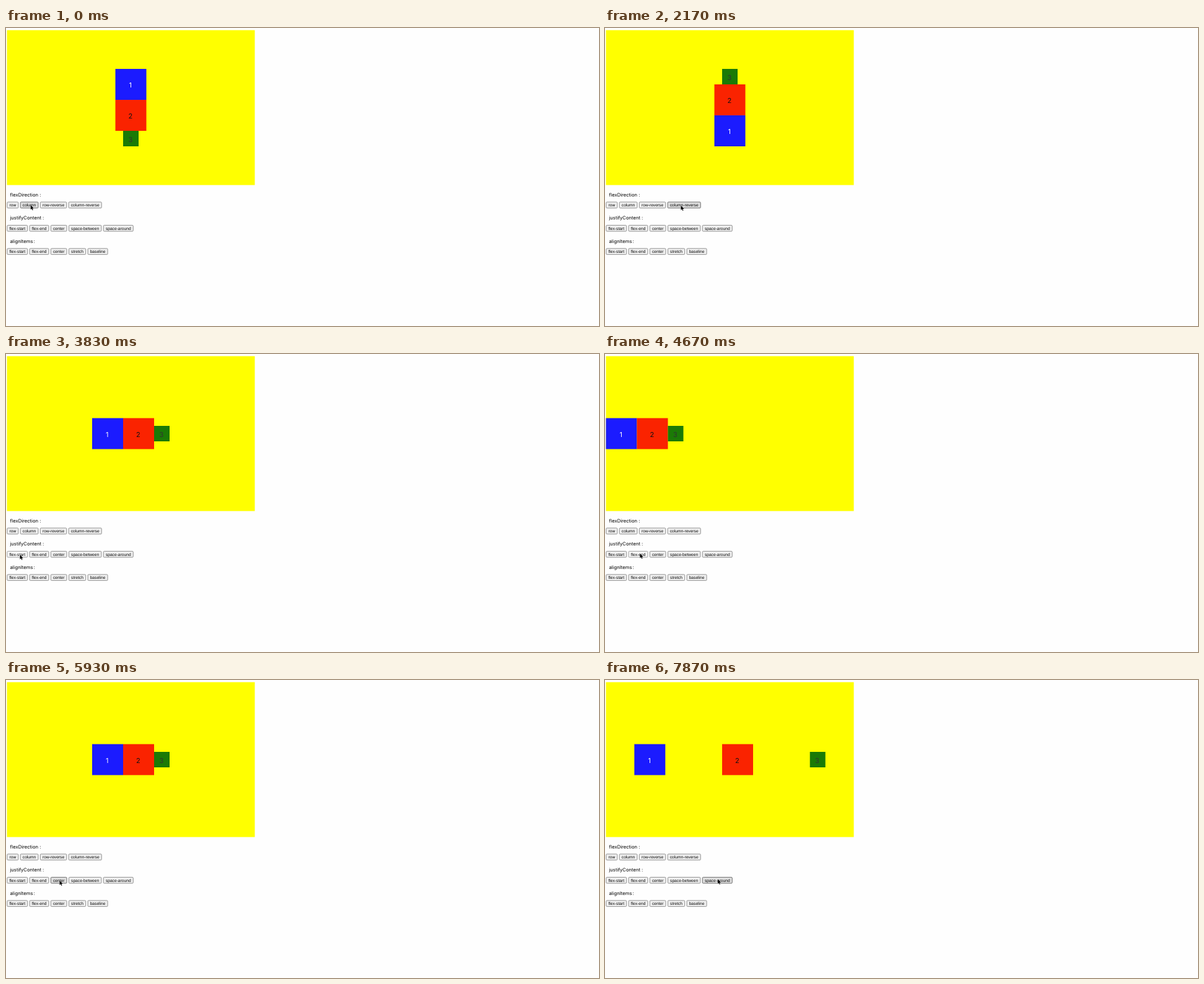
These frames come from a looping animation (957x481 px, 8000 ms). An HTML page:

```html
<!DOCTYPE html>
<html lang="en">
<head>
<meta charset="utf-8">
<title>Flexbox demo</title>
<style>
  html, body { margin: 0; width: 100%; height: 100%; overflow: hidden; background: #fefefe; }
  svg { display: block; width: 100vw; height: 100vh; }
  text { text-rendering: geometricPrecision; user-select: none; }
  .label { font: 7.65px Inter, Roboto, sans-serif; }
  .digit { font: 11px Inter, Roboto, sans-serif; text-anchor: middle; }
  .button text { font: 6.667px "Liberation Sans", Arial, sans-serif; text-anchor: middle; }
  .button rect { fill: #efefef; stroke: #767676; stroke-width: .8; }
  .button.hover rect { fill: #dedede; stroke: #4f4f4f; }
  .button.active rect { fill: #f5f5f5; stroke: #8d8d8d; }
</style>
</head>
<body>
<svg id="stage" viewBox="0 0 957 481"></svg>
<script>
const LOOP = 8000;
const BOX = { x: 1.5, y: 3.5, w: 400, h: 250 };
const BUTTON_H = 10.5, GAP = 2.6;
const stage = document.getElementById('stage');

function add(parent, tag, attrs, text) {
  const node = document.createElementNS('http://www.w3.org/2000/svg', tag);
  for (const key in attrs) node.setAttribute(key, attrs[key]);
  if (text) node.textContent = text;
  return parent.appendChild(node);
}

add(stage, 'rect', { x: BOX.x, y: BOX.y, width: BOX.w, height: BOX.h, fill: '#ffff00' });

const items = [
  { size: 50, fill: '#1b1bff', ink: '#fff', base: 5 },
  { size: 50, fill: '#fa2300', ink: '#111', base: 5 },
  { size: 25, fill: '#1b7a06', ink: '#333', base: 5.5 }
].map((item, i) => {
  const { size, fill, ink, base } = item;
  const node = add(stage, 'g', {});
  add(node, 'rect', { width: size, height: size, fill });
  add(node, 'text', { class: 'digit', x: size / 2 - 0.7, y: size / 2 + base, fill: ink }, String(i + 1));
  return { size, node };
});

// Each row: label, colon position, top of the buttons, [caption, width] pairs.
const rows = [
  ['flexDirection', 54.3, 280.5,
    [['row', 18.74], ['column', 29.5], ['row-reverse', 43.2], ['column-reverse', 53.9]]],
  ['justifyContent', 59, 318,
    [['flex-start', 33.56], ['flex-end', 31.7], ['center', 26.5], ['space-between', 53.2], ['space-around', 48.8]]],
  ['alignItems', 44.5, 355.5,
    [['flex-start', 33.56], ['flex-end', 31.7], ['center', 26.5], ['stretch', 28], ['baseline', 32.8]]]
];

const buttons = [];
for (const [label, colonX, y, captions] of rows) {
  add(stage, 'text', { class: 'label', x: 6.5, y: y - 8.7 }, label);
  add(stage, 'text', { class: 'label', x: colonX, y: y - 8.7 }, ':');
  let x = BOX.x;
  for (const [caption, w] of captions) {
    const node = add(stage, 'g', { class: 'button' });
    add(node, 'rect', { x: x + 0.4, y: y + 0.4, width: w - 0.8, height: BUTTON_H - 0.8, rx: 1.3 });
    add(node, 'text', { x: x + w / 2, y: y + 7.5 }, caption);
    buttons.push({ node, x, y, w });
    x += w + GAP;
  }
}

const cursor = add(stage, 'path', {
  d: 'M0 0V7.4L1.7 5.8L2.8 8.5L4 8L2.9 5.4H5.2Z',
  fill: '#000', stroke: '#fff', 'stroke-width': 0.6, 'paint-order': 'stroke'
});

// Pointer moves: start, end, target x and y, optional bend point.
const home = [39.8, 285.8];
const moves = [
  [200, 430, 76.5, 286.5],
  [900, 1730, 122.5, 286.5, 70, 417],
  [2270, 2400, 44, 290, 95, 330],
  [2430, 2610, 10.5, 286.5],
  [3300, 3720, 22.5, 324],
  [4270, 4620, 56.5, 322],
  [4850, 5070, 61, 324],
  [5100, 5520, 86.5, 323.5],
  [5930, 6130, 127, 320],
  [6800, 7370, 182, 321.5, 152, 382]
];

// Clicks: press, release, and the layout set on release.
const clicks = [
  [770, 840, 'row-reverse', 'center'],
  [2070, 2150, 'column-reverse', 'center'],
  [2880, 2970, 'row', 'center'],
  [3830, 3930, 'row', 'flex-start'],
  [4670, 4770, 'row', 'flex-end'],
  [5640, 5730, 'row', 'center'],
  [6300, 6420, 'row', 'space-between'],
  [7730, 7830, 'row', 'space-around']
];

function pointerAt(t) {
  let [x, y] = home;
  for (const [start, end, tx, ty, bx = (x + tx) / 2, by = (y + ty) / 2] of moves) {
    if (t < start) break;
    const u = Math.min(1, (t - start) / (end - start));
    const s = u * u * (3 - 2 * u), r = 1 - s;
    x = r * r * x + 2 * r * s * bx + s * s * tx;
    y = r * r * y + 2 * r * s * by + s * s * ty;
  }
  return [x, y];
}

function place(direction, justify) {
  const vertical = direction.startsWith('column');
  const main = vertical ? BOX.h : BOX.w;
  const cross = vertical ? BOX.w : BOX.h;
  const free = main - items.reduce((sum, item) => sum + item.size, 0);
  const [lead, gap] = {
    'flex-start': [0, 0],
    'flex-end': [free, 0],
    'center': [free / 2, 0],
    'space-between': [0, free / 2],
    'space-around': [free / 6, free / 3]
  }[justify];
  let pos = lead;
  for (const { size, node } of items) {
    const along = direction.endsWith('reverse') ? main - pos - size : pos;
    const across = (cross - size) / 2;
    const [dx, dy] = vertical ? [across, along] : [along, across];
    node.setAttribute('transform', `translate(${BOX.x + dx} ${BOX.y + dy})`);
    pos += size + gap;
  }
}

function draw(t) {
  const [px, py] = pointerAt(t);
  const pressed = clicks.some(([down, up]) => t >= down && t < up);
  let direction = 'column', justify = 'center';
  for (const [, up, dir, just] of clicks) {
    if (t >= up) [direction, justify] = [dir, just];
  }
  place(direction, justify);
  for (const { node, x, y, w } of buttons) {
    const over = px >= x && px <= x + w && py >= y && py <= y + BUTTON_H;
    node.setAttribute('class', 'button' + (over ? (pressed ? ' active' : ' hover') : ''));
  }
  cursor.setAttribute('transform', `translate(${px} ${py})`);
}

const began = performance.now();
function tick() {
  draw((performance.now() - began) % LOOP);
  requestAnimationFrame(tick);
}
tick();
</script>
</body>
</html>
```
